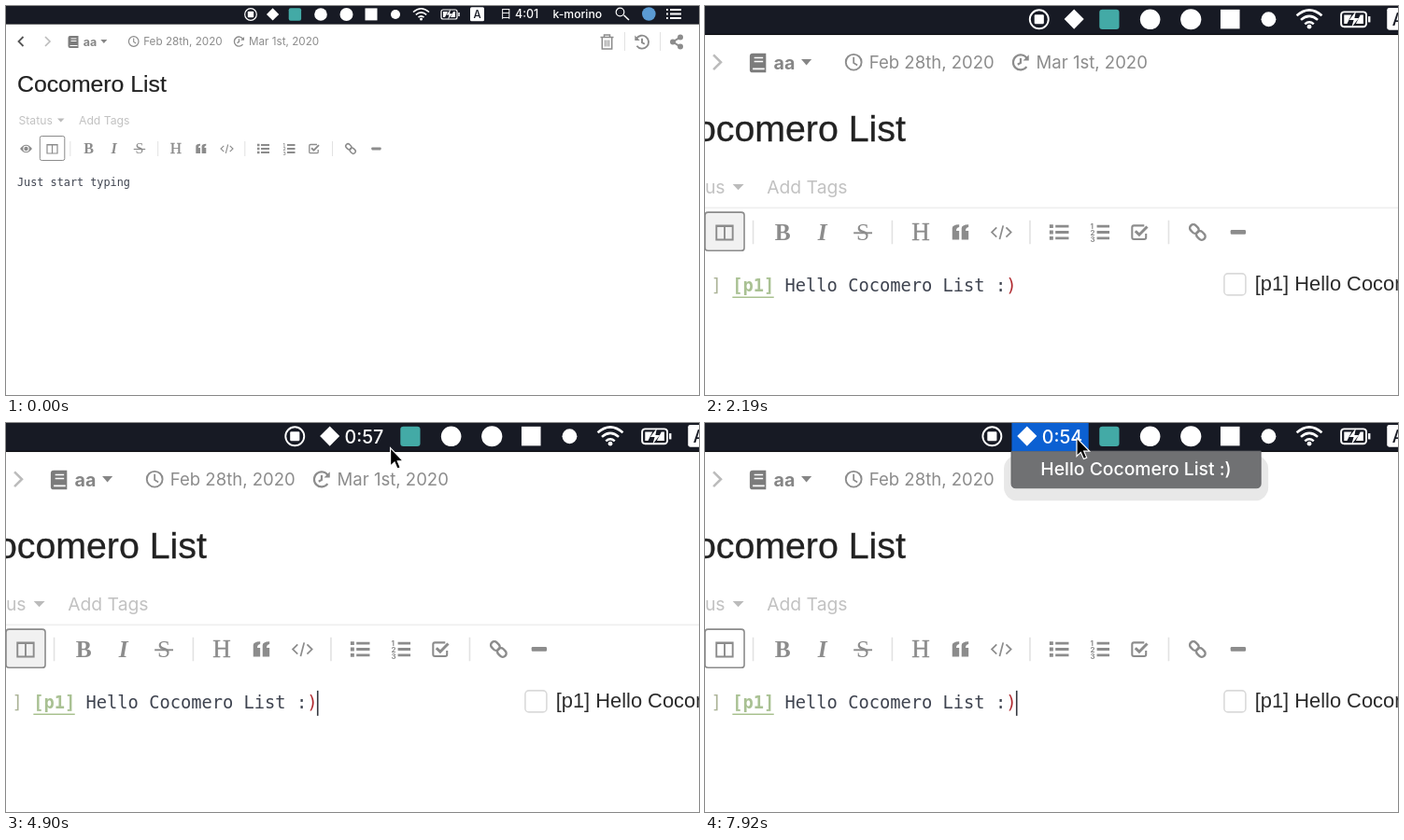
Write an HTML page that moves like this. It is 742x417 px and loops after 8000 ms.

```html
<!DOCTYPE html>
<html lang="en">
<head>
<meta charset="utf-8">
<title>Timer note</title>
<style>
  html, body { margin: 0; height: 100%; overflow: hidden; background: #fff; }
  svg { display: block; width: 100vw; height: 100vh; }
  text { white-space: pre; font-family: Inter, "Noto Sans CJK JP", sans-serif; }
  .bar text { font-size: 12.4px; font-weight: 500; fill: #fff; }
  .sans { font-family: "Liberation Sans", sans-serif; }
  .mono { font: 11.82px "DejaVu Sans Mono", monospace; fill: #3f4450; }
  .serif { font: 700 16px "Liberation Serif", serif; text-anchor: middle; }
  .line { fill: none; stroke: currentColor; }
  .gray { color: #8c8c8c; fill: #8c8c8c; }
  .date { font-size: 11.7px; }
  .pale { fill: #c2c2c2; font-size: 12.2px; }
  .rule { stroke: #e2e2e2; fill: none; }
  .bracket { fill: #abb397; }
  .tag { fill: #a9c193; font-weight: 700; }
  .close { fill: #b0292f; }
</style>
</head>
<body>
<svg viewBox="0 0 742 417" preserveAspectRatio="none">
  <defs>
    <g id="history" class="line">
      <path d="M-6 -3.4A7 7 0 1 1-5.6 4.3M0 -3.8V.6L2.8 2.2" stroke-width="1.9"/>
      <path d="M-7.7 -7V-1.6H-2.3Z" fill="currentColor" stroke="none"/>
    </g>
  </defs>

  <g id="screen">
    <rect width="742" height="417" fill="#fff"/>

    <!-- note header -->
    <path d="M18.5 33L13.5 38L18.5 43" class="line" color="#555" stroke-width="1.8"/>
    <path d="M42 33L47 38L42 43" class="line" color="#bbb" stroke-width="1.6"/>
    <g class="gray">
      <path d="M68.5 32H77.5V45H68.5Q66.5 45 66.5 43V34Q66.5 32 68.5 32Z" fill="#7c7c7c"/>
      <path d="M69.5 35H75.5M69.5 37.5H75.5M68.5 42.5H76.5" stroke="#fff"/>
      <text x="82.7" y="42.6" font-size="12.4" font-weight="700" fill="#868686">aa</text>
      <path d="M101.3 36H108.3L104.8 40Z" fill="#868686"/>
      <circle cx="136.7" cy="38" r="5.3" class="line" stroke-width="1.2"/>
      <path d="M136.7 34.5V38.5L139.2 40" class="line" stroke-width="1.1"/>
      <text x="147.2" y="42.3" class="date">Feb 28th, 2020</text>
      <use href="#history" transform="translate(249.5 38) scale(-.72 .72)"/>
      <text x="260" y="42.3" class="date">Mar 1st, 2020</text>
      <g class="line" stroke-width="1.5">
        <path d="M636.5 33.5H650.5M640.5 33V31H646.5V33M638.3 34V46H648.7V34"/>
        <path d="M641.5 36.5V43.5M643.5 36.5V43.5M645.5 36.5V43.5" stroke-width="1"/>
      </g>
      <use href="#history" x="681" y="38.5"/>
      <path d="M722 33.3L714 38.5L722 43.7" class="line" stroke-width="2"/>
      <circle cx="722" cy="33.5" r="3"/><circle cx="714" cy="38.5" r="3"/><circle cx="722" cy="43.5" r="3"/>
    </g>
    <path d="M662.5 28V48M700.5 28V48" class="rule"/>
    <text x="12" y="91.5" class="sans" font-size="24.8" fill="#222" stroke="#222" stroke-width=".2">Cocomero List</text>
    <text x="13.5" y="127" class="pale">Status</text>
    <path d="M55 120.5H62.5L58.7 124.5Z" fill="#bbb"/>
    <text x="78" y="127" class="pale">Add Tags</text>
    <path id="divider" d="M12 136.5H708" stroke="#efefef"/>

    <!-- editor toolbar -->
    <path d="M68.8 145V161M162.7 145V161M255.8 145V161M349.5 145V161" class="rule"/>
    <g class="gray">
      <path d="M15 153Q21.5 144.5 28 153Q21.5 161.5 15 153Z"/>
      <circle cx="21.5" cy="153" r="3.2" fill="#fff"/><circle cx="21.5" cy="153" r="2.2"/>
      <g transform="translate(.5)">
        <rect id="split" x="35.8" y="139.5" width="26.5" height="26" rx="2" stroke="#8b8b8b"/>
        <path d="M43.5 148.5H54.5V158H43.5ZM49 148V158M43 149H55" class="line" stroke-width="1.2"/>
      </g>
      <text x="88.7" y="158.4" class="serif">B</text>
      <text x="115.6" y="158.4" class="serif" style="font-style:italic">I</text>
      <text x="143" y="158.4" class="serif" style="font-weight:400">S</text>
      <path d="M136.7 153.5H149.2" class="line" stroke-width="1.2"/>
      <text x="182" y="158.4" class="serif" style="font-weight:400;font-size:17px" stroke="#8c8c8c" stroke-width=".3">H</text>
      <path id="quote" d="M203.3 150.3Q203.3 148 208 147.8V149.5Q206 149.8 206 152H208V158H203.3Z"/>
      <use href="#quote" x="6.3"/>
      <path d="M233.3 149.8L230 153L233.3 156.2M239.7 149.8L243 153L239.7 156.2M237.7 148.5L235.3 157.8" class="line" stroke-width="1.1"/>
      <path d="M273 149H282M273 153H282M273 157H282M301 149H309.5M301 153H309.5M301 157H309.5" class="line" stroke-width="1.8"/>
      <path d="M269 149H271.5M269 153H271.5M269 157H271.5" class="line" stroke-width="2.4"/>
      <g font-size="5" font-weight="700"><text x="296.5" y="150.5">1</text><text x="296.5" y="155">2</text><text x="296.5" y="159.5">3</text></g>
      <path d="M333 148.5H326Q324.8 148.5 324.8 149.7V156.5Q324.8 157.7 326 157.7H333Q334.2 157.7 334.2 156.5V154" class="line" stroke-width="1.3"/>
      <path d="M327 152.2L329.6 154.7L335 149.2" class="line" stroke-width="1.9"/>
      <g class="line" stroke-width="1.5" transform="rotate(45 369 153)">
        <rect x="362.6" y="150.6" width="6.6" height="4.8" rx="2.4"/>
        <rect x="368.8" y="150.6" width="6.6" height="4.8" rx="2.4"/>
      </g>
      <rect x="391.3" y="151.4" width="10.3" height="3" rx=".8"/>
    </g>

    <!-- editor and preview -->
    <text id="editor" x="12" y="193" class="mono"></text>
    <path id="underline" d="M54.8 197H82.8" stroke="#a9c18f"/>
    <path id="caret" d="M0 181V198" stroke="#33363e"/>
    <rect id="checkbox" x="387" y="181" width="14.5" height="14.5" rx="2.5" fill="#fff" stroke="#dadada"/>
    <text id="preview" y="192.5" class="sans" font-size="13.8" fill="#2b2b2b"></text>

    <!-- menu bar -->
    <g class="bar" fill="#fff" color="#fff">
      <rect width="742" height="19.6" fill="#040508"/>
      <rect width="742" height="19" fill="#171a24"/>
      <g id="tray">
        <g id="menu">
          <rect x="270" y="22" width="178.6" height="30.6" rx="9" fill="#e8e8e8"/>
          <path d="M275 19H443.6V41Q443.6 44 440.6 44H278Q275 44 275 41Z" fill="#707173" stroke="#5f6062" stroke-width=".5"/>
          <text x="294.8" y="35.1" style="font-size:12.2px;font-weight:550">Hello Cocomero List :)</text>
          <rect id="highlight" x="275.3" width="50" height="19" fill="#0b60d2"/>
        </g>
        <circle cx="262" cy="9" r="6.3" class="line" stroke-width="1.2"/>
        <rect x="258.8" y="5.8" width="6.4" height="6.4" rx=".8"/>
        <rect x="280.9" y="4.2" width="9.4" height="9.4" transform="rotate(45 285.6 8.9)"/>
      </g>
      <text id="timer" x="291.3" y="14" text-anchor="end"></text>
      <rect x="302.7" y="2.3" width="13.4" height="13.4" rx="2" fill="#43aaa6"/>
      <circle cx="337" cy="9" r="6.8"/>
      <circle cx="364.5" cy="9" r="7"/>
      <rect x="384.5" y="2.4" width="13" height="13"/>
      <circle cx="417" cy="9" r="5"/>
      <g class="line" stroke-width="1.6">
        <path d="M436 6.5Q444.5 -1 453 6.5M438.8 9.4Q444.5 4.4 450.2 9.4M441.5 12.2Q444.5 9.6 447.5 12.2"/>
        <rect x="466" y="4" width="17" height="10" rx="2" stroke-width="1.2"/>
        <path d="M485 7V11" stroke-width="1.5"/>
        <path d="M667 15L661.5 9.7" stroke-width="1.5"/>
        <circle cx="657.5" cy="6.5" r="4.3" stroke-width="1.2"/>
        <path d="M711 4H723M711 8.5H723M711 13H723M707 4H709M707 8.5H709M707 13H709" stroke-width="1.9"/>
      </g>
      <circle cx="444.5" cy="14" r="1.5"/>
      <path d="M468 6H473L470 12H468ZM481 12H476L479 6H481Z"/>
      <path d="M476 3.5L471.5 9.5H474.5L473 14.5L478 8.2H475Z"/>
      <rect x="497" y="1.2" width="15" height="15" rx="1.5"/>
      <text x="504.5" y="13" text-anchor="middle" style="fill:#171a24;font-size:11.5px">A</text>
      <text x="529" y="13.2">日</text>
      <text x="545" y="13.2">4:01</text>
      <text x="585.5" y="13.2" style="font-size:12.2px">k-morino</text>
      <circle cx="688.3" cy="8.5" r="7.3" fill="#5b9bd3"/>
    </g>
  </g>
  <path id="pointer" d="M0 0V19.5L4.4 15.4L7.5 22.5L10.7 21.1L7.7 14.2H13.7Z" fill="#000" stroke="#fff" stroke-width="1.2"/>
</svg>

<script>
const LOOP = 8000;
const NOTE = "- [ ] [p1] Hello Cocomero List :)";
const STYLES = [[0, 2, ""], [2, 6, "bracket"], [6, 10, "tag"], [10, 32, ""], [32, 33, "close"]];
const TEXT_X = 12, CHAR_WIDTH = 7.116;
const TICKS = [2530, 3500, 4480, 5500, 6400, 7400];
const MENU_OPEN = 5500, POINTER_IN = 4020;
const POINTER_PATH = [[4020, 325, 370], [4860, 412, 27], [5250, 398, 16]];

const el = id => document.getElementById(id);
const clamp = v => Math.min(1, Math.max(0, v));
const progress = (t, from, to) => clamp((t - from) / (to - from));
const ease = p => p * p * (3 - 2 * p);
const show = (id, visible) => { el(id).style.display = visible ? "" : "none"; };
const move = (id, x, y = 0) => el(id).setAttribute("transform", `translate(${x} ${y})`);

function drawNote(t) {
  const count = Math.min(NOTE.length, Math.max(0, Math.floor((t - 85) / 56)));
  el("editor").innerHTML = count
    ? STYLES.map(([a, b, name]) => `<tspan class="${name}">${NOTE.slice(a, Math.min(b, count))}</tspan>`).join("")
    : "Just start typing";
  show("underline", count >= 10);

  // the preview trails the editor by one character
  const rendered = t > 1960 ? count : Math.max(0, count - 1);
  const isTask = rendered > 6;
  show("checkbox", isTask);
  el("preview").setAttribute("x", isTask ? 407.7 : 387);
  el("preview").textContent = NOTE.slice(isTask ? 6 : 0, rendered);

  const phase = (t - 1550 + 2 * 980) % 980;
  const blink = progress(phase, 0, 100) * (1 - progress(phase, 510, 610));
  move("caret", TEXT_X + count * CHAR_WIDTH);
  el("caret").style.opacity = count ? (t < 1950 ? 1 : blink) : 0;
}

function drawTimer(t) {
  const ticks = TICKS.filter(start => t >= start).length;
  const seconds = 60 - ticks;
  const shift = !ticks ? 0 : [55, 57].includes(seconds) ? -30.6 : -31.8;
  el("timer").textContent = ticks ? `0:${seconds}` : "";
  move("tray", shift);
  el("highlight").setAttribute("width", 20.1 - shift);
  show("menu", t >= MENU_OPEN);
}

function drawPointer(t) {
  show("pointer", t >= POINTER_IN);
  let [, x, y] = POINTER_PATH[0];
  for (let i = 1; i < POINTER_PATH.length; i++) {
    const [from, x0, y0] = POINTER_PATH[i - 1], [to, x1, y1] = POINTER_PATH[i];
    if (t < from) break;
    const p = ease(progress(t, from, to));
    x = x0 + (x1 - x0) * p;
    y = y0 + (y1 - y0) * p;
  }
  move("pointer", x, y);
}

function draw(t) {
  const zoom = ease(progress(t, 1760, 2190));
  el("screen").setAttribute("transform", `translate(${-57.5 * zoom} 0) scale(${1 + 0.585 * zoom})`);
  const editing = t >= 90 && t < MENU_OPEN;
  el("split").setAttribute("fill", editing ? "#f1f1f1" : "#fff");
  show("divider", editing);
  drawNote(t);
  drawTimer(t);
  drawPointer(t);
}

function frame() {
  draw(performance.now() % LOOP);
  requestAnimationFrame(frame);
}
frame();
</script>
</body>
</html>
```
